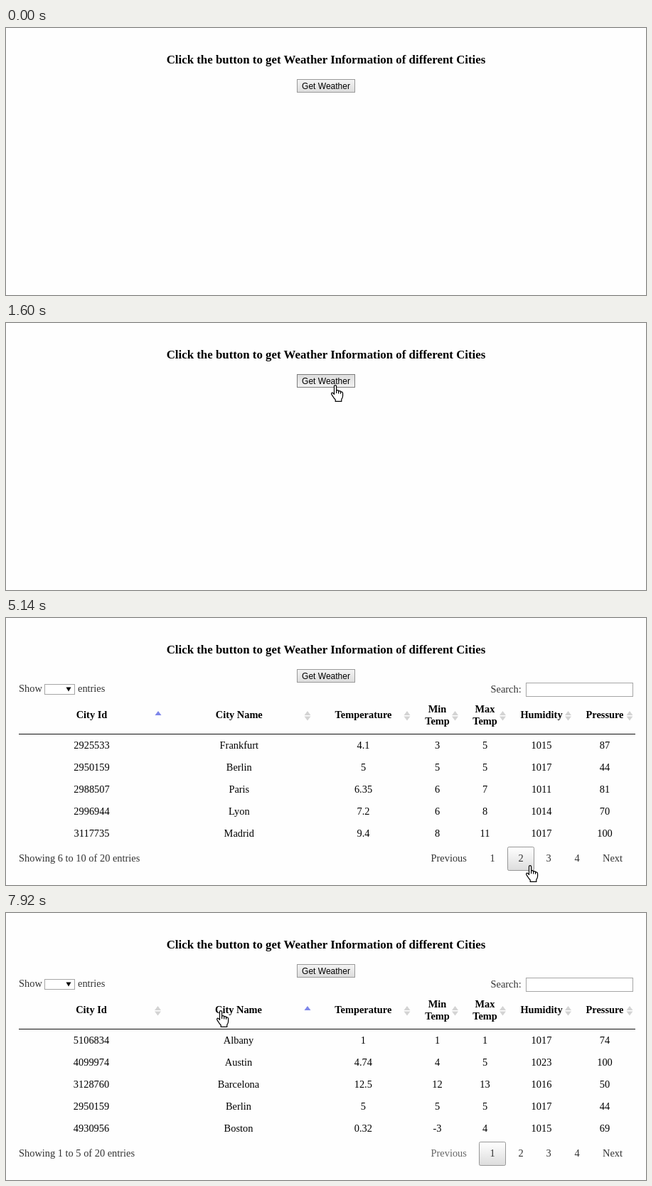
An HTML page for the animation above (8000 ms loop, 900x376 px).

```html
<!DOCTYPE html>
<html lang="en">
<head>
<meta charset="utf-8">
<title>Weather table</title>
<style>
  html, body { margin: 0; width: 100%; height: 100%; overflow: hidden; background: #fefefe; }
  svg { display: block; width: 900px; height: 376px; }
  text { font: 14.4px "Liberation Serif", "Times New Roman", serif; fill: #000; white-space: pre; }
  .mid { text-anchor: middle; }
  .bold { font-weight: bold; }
  .title { font-size: 16.85px; }
  .label { fill: #333; }
  .off { fill: #666; }
  .lit { fill: #fff; }
  .ui { font: 12px "Liberation Sans", Arial, sans-serif; }
  .field { fill: #fff; stroke: #a6a6a6; }
  .both { fill: #d3d3d3; }
  .asc { fill: #7d86ea; }
</style>
</head>
<body>
<svg viewBox="0 0 900 376" xmlns="http://www.w3.org/2000/svg">
  <defs id="defs"></defs>
  <rect width="900" height="376" fill="#fefefe"/>
  <text class="title bold mid" x="450" y="50">Click the button to get Weather Information of different Cities</text>
  <rect id="get" x="409.5" y="72.5" width="81" height="18"/>
  <text class="ui mid" x="450" y="86">Get Weather</text>
  <g id="panel">
    <text class="label" x="18" y="104">Show</text>
    <rect class="field" x="54.5" y="93.5" width="42" height="14"/>
    <path d="M84.5 97.5h7l-3.5 6z"/>
    <text class="label" x="101" y="104">entries</text>
    <text class="label" x="681.5" y="105">Search:</text>
    <rect class="field" x="731.5" y="91.5" width="150" height="19"/>
    <rect x="18" y="163" width="867" height="1" fill="#111"/>
    <g id="table"></g>
    <g id="pager"></g>
  </g>
  <path id="arrow" fill="#fff" stroke="#000" stroke-linejoin="miter"
    d="M.5 .5V16.5L4.3 12.9L7 18.5L9.3 17.5L6.8 12H11.7Z"/>
  <g id="hand" fill="#fff" stroke="#000" stroke-width="1.2" stroke-linejoin="round">
    <path d="M-1.5 2Q-1.5 .6 0 .6Q1.6 .6 1.6 2V8Q3.2 7 4.7 8.2V9Q6.2 8 7.6 9.2V10Q10.6 9.4 10.6 12V15.5Q10.6 18.5 8.8 20.5V23.4H.2V21Q-2 19 -3.2 16.6L-5.2 13.4Q-5.8 11.2 -3.9 11.2Q-2.6 11.6 -1.5 13.4Z"/>
    <path fill="none" d="M1.6 8V12M4.7 9V12.4M7.6 10V12.8"/>
  </g>
  <rect id="flash" width="900" height="376"/>
</svg>
<script>
const LOOP = 8000, STEP = 1000 / 28;
const $ = id => document.getElementById(id);
const show = (el, on) => el.style.display = on ? "" : "none";
const text = (x, y, s, cls) => `<text x="${x}" y="${y}" class="${cls}">${s}</text>`;

const skins = {
  plain: ["#f4f4f4", "#dcdcdc", "#999"],
  over: ["#f8f8f8", "#e0e0e0", "#7c7c7c"],
  down: ["#dcdcdc", "#f2f2f2", "#7c7c7c"],
  current: ["#ffffff", "#dcdcdc", "#979797"],
  hover: ["#585858", "#111111", "#111"],
  press: ["#2b2b2b", "#0c0c0c", "#111"]
};
$("defs").innerHTML = Object.entries(skins).map(([name, [a, b]]) =>
  `<linearGradient id="${name}" x2="0" y2="1"><stop stop-color="${a}"/><stop offset="1" stop-color="${b}"/></linearGradient>`
).join("");
const paint = name => `fill="url(#${name})" stroke="${skins[name][2]}"`;

const pages = [
  `2633352|York|3.57|3|4|1006|100
2643741|City of London|5.27|4|6|1006|87
2644688|Leeds|3.2|3|4|1006|100
2654675|Bristol|4.68|4|5|1003|100
2911298|Hamburg|3.35|3|4|1014|59`,
  `2925533|Frankfurt|4.1|3|5|1015|87
2950159|Berlin|5|5|5|1017|44
2988507|Paris|6.35|6|7|1011|81
2996944|Lyon|7.2|6|8|1014|70
3117735|Madrid|9.4|8|11|1017|100`,
  `3128760|Barcelona|12.5|12|13|1016|50
4099974|Austin|4.74|4|5|1023|100
4140963|Washington, D. C.|-1.46|-3|2|1023|92
4440906|Philadelphia|11|11|11|1020|93
4930956|Boston|0.32|-3|4|1015|69`,
  `5106834|Albany|1|1|1|1017|74
5128581|New York|2.3|1|4|1016|64
5368361|Los Angeles|14.2|12|17|1019|48
5391959|San Francisco|11.6|9|13|1021|76
5809844|Seattle|6.8|5|8|1018|87`,
  `5106834|Albany|1|1|1|1017|74
4099974|Austin|4.74|4|5|1023|100
3128760|Barcelona|12.5|12|13|1016|50
2950159|Berlin|5|5|5|1017|44
4930956|Boston|0.32|-3|4|1015|69`
].map(p => p.split("\n").map(r => r.split("|")));

const heads = ["City Id", "City Name", "Temperature", "Min Temp", "Max Temp", "Humidity", "Pressure"];
const fixedCols = [606.5, 673.5, 753, 842], fixedIcons = [424, 564, 631.5, 698.5, 790.5, 877];
// centres of the first three columns and the first sort icon
const wide = [120.5, 327.8, 502.5, 214], narrow = [118.5, 326, 503.5, 210.5], even = [120, 327, 502.3, 213.5];
const layouts = [wide, wide, narrow, even, even];

function icon(x, sorted) {
  const up = `M${x - 4.5} 137L${x} 131L${x + 4.5} 137Z`;
  return sorted ? `<path class="asc" d="${up}"/>`
    : `<path class="both" d="${up}M${x - 4.5} 138.5L${x} 144.5L${x + 4.5} 138.5Z"/>`;
}

function drawTable(view) {
  const [a, b, c, first] = layouts[view];
  const cols = [a, b, c, ...fixedCols], icons = [first, ...fixedIcons];
  const sorted = view === 4 ? 1 : 0, page = view % 4;
  let s = "";
  heads.forEach((h, i) => {
    const lines = h.endsWith(" Temp") ? h.split(" ") : [h];
    lines.forEach((l, j) => s += text(cols[i], lines.length > 1 ? 133 + 17 * j : 141, l, "bold mid"));
    s += icon(icons[i], i === sorted);
  });
  pages[view].forEach((row, r) => row.forEach((v, i) => s += text(cols[i], 184 + 31 * r, v, "mid")));
  s += text(18, 343, `Showing ${page * 5 + 1} to ${page * 5 + 5} of 20 entries`, "label");
  $("table").innerHTML = s;
}

const pageX = [665, 705, 744, 784];
function drawPager(page, hot, pressed) {
  let s = text(597.5, 343, "Previous", page ? "label" : "off");
  pageX.forEach((x, i) => {
    const skin = i === page ? "current" : i !== hot ? "" : pressed ? "press" : "hover";
    if (skin) s += `<rect x="${x + .5}" y="322.5" width="37" height="33" rx="1.8" ${paint(skin)}/>`;
    s += text(x + 19, 343, i + 1, "mid " + (i === hot && i !== page ? "lit" : "label"));
  });
  $("pager").innerHTML = s + text(839, 343, "Next", page === 3 ? "off" : "label");
}

// time, x, y of the pointer tip
const path = [
  [390, 510, -10], [520, 468, 36], [640, 412, 84], [750, 393, 105], [850, 379, 113], [1000, 452, 96],
  [1140, 453, 95], [1350, 463, 87], [3070, 463, 87], [3250, 488, 160], [3570, 558, 378],
  [3780, 721, 374], [4000, 726, 362], [4140, 725, 354.5], [4280, 721, 348],
  [5030, 721, 348], [5280, 757, 348], [5740, 757, 348], [6030, 793, 349], [6140, 793, 348],
  [6500, 793, 348], [6620, 755, 317], [6900, 520, 215], [7140, 325, 160], [7280, 281, 147],
  [7320, 282, 147], [7670, 302, 137], [LOOP, 302, 137]
];
function pointer(t) {
  const q = Math.floor((t + 10) / STEP) * STEP;
  if (t < 390 || (t >= 3570 && t < 3780)) return null;
  const i = Math.max(1, path.findIndex(p => p[0] > q));
  const [t0, x0, y0] = path[i - 1], [t1, x1, y1] = path[i];
  const u = Math.min(1, Math.max(0, (q - t0) / (t1 - t0)));
  return { x: Math.round(x0 + (x1 - x0) * u), y: Math.round(y0 + (y1 - y0) * u) };
}

const during = (t, a, b) => t >= a && t < b;
const turns = [4750, 5710, 6500, 7920];
let lastView, lastPager;

function draw(t) {
  show($("flash"), during(t, 30, 70));
  const open = t >= 2640, p = pointer(t);
  show($("panel"), open);
  const view = turns.filter(x => t >= x).length;
  if (view !== lastView) drawTable(lastView = view);

  const onGet = p && p.x >= 409 && p.x < 491 && p.y >= 72 && p.y < 91;
  const skin = during(t, 1600, 1820) ? "down" : onGet ? "over" : "plain";
  $("get").setAttribute("fill", `url(#${skin})`);
  $("get").setAttribute("stroke", skins[skin][2]);

  const over = open && p && p.y >= 322 && p.y < 357 ? pageX.findIndex(x => p.x >= x && p.x < x + 38) : -1;
  const hot = over >= 0 && p.y < 354 ? over : -1;
  const pressed = during(t, 4530, 4750) || during(t, 5570, 5710) || during(t, 6350, 6500);
  const key = [view, hot, pressed].join();
  if (key !== lastPager) drawPager(view % 4, hot, pressed), lastPager = key;

  const onHead = open && p && p.y >= 113 && p.y < 163 && t > 6500;
  const hand = onGet || over >= 0 || onHead;
  show($("hand"), p && hand);
  show($("arrow"), p && !hand);
  if (p) $(hand ? "hand" : "arrow").setAttribute("transform", `translate(${p.x} ${p.y})`);
}

const start = performance.now();
function tick() {
  draw((performance.now() - start) % LOOP);
  requestAnimationFrame(tick);
}
tick();
</script>
</body>
</html>
```
